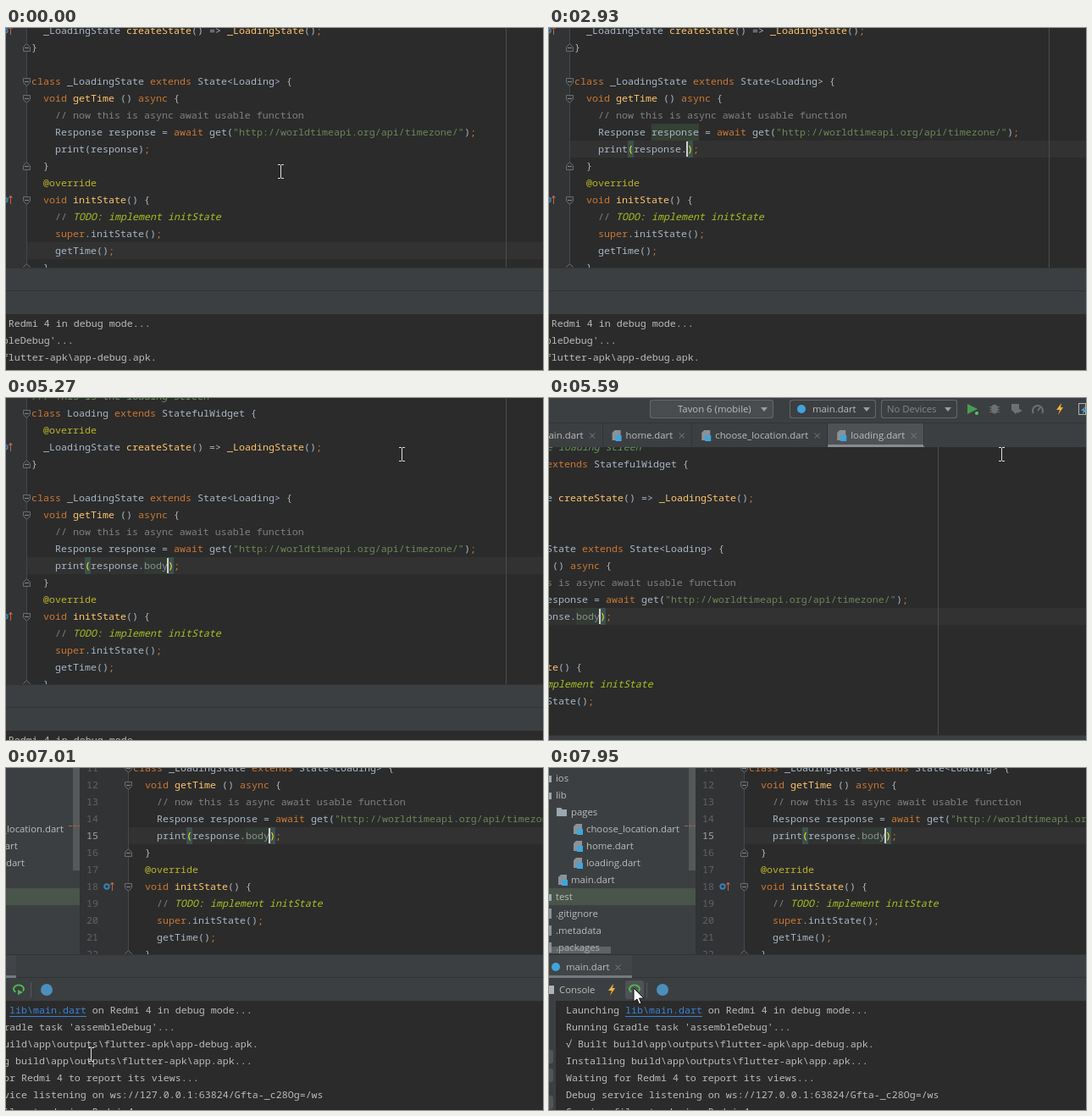
These frames come from a looping animation (634x404 px, 8000 ms). An HTML page with a canvas:

```html
<!DOCTYPE html>
<html lang="en">
<head>
<meta charset="utf-8">
<title>Editor session</title>
<style>
html, body { margin: 0; width: 100%; height: 100%; overflow: hidden; background: #2b2b2b; }
canvas { display: block; }
</style>
</head>
<body>
<canvas id="stage" width="634" height="404"></canvas>
<script>
const g = document.getElementById('stage').getContext('2d');
const W = 634, H = 404, LOOP = 8000, STEP = 79;
const MARGIN_X = 100, MARGIN_Y = 66, TOP = -148, ROW = 20, CHAR = 7;
const MONO = "11.67px 'Noto Sans Mono', 'DejaVu Sans Mono', monospace";
const UI = "11.35px 'Open Sans', 'Noto Sans', sans-serif";
const PANEL = '#3c3f41', DARK = '#2b2b2b', LINE = '#323232', HOVER = '#4f5355', GREY = '#6e7173';
const TEXT = '#a9b7c6', LABEL = '#bbbbbb', ORANGE = '#cc7832', YELLOW = '#ffc66d';
const BLUE = '#40a5dc', GREEN = '#499c54', ICON = '#afb1b3';

// Pointer strokes: start, end (ms), destination in world space
const moves = [
  [520, 990, 111, 101], [1070, 1310, 160, 136], [1380, 1610, 158, 138], [2240, 2380, 316, 139],
  [5200, 5270, 467, 11], [5360, 6050, 804, -91], [6370, 6370, 808, -91],
  [6460, 7000, -20, 401], [7080, 7160, -49, 362], [7390, 7470, -63, 343], [7560, 7950, -106, 323]
];

const code = `/// This is the loading screen
class Loading extends StatefulWidget {
  @override
  _LoadingState createState() => _LoadingState();
}

class _LoadingState extends State<Loading> {
  void getTime () async {
    // now this is async await usable function
    Response response = await get("http://worldtimeapi.org/api/timezone/");

  }
  @override
  void initState() {
    // TODO: implement initState
    super.initState();
    getTime();
  }`.split('\n');
const log = String.raw`Launching lib\main.dart on Redmi 4 in debug mode...
Running Gradle task 'assembleDebug'...
√ Built build\app\outputs\flutter-apk\app-debug.apk.
Installing build\app\outputs\flutter-apk\app.apk...
Waiting for Redmi 4 to report its views...
Debug service listening on ws://127.0.0.1:63824/Gfta-_c28Og=/ws
Syncing files to device Redmi 4...`.split('\n');
const tree = `android
ios
lib
 pages
  choose_location.dart
  home.dart
  loading.dart
 main.dart
test
.gitignore
.metadata
.packages`.split('\n');
const members = `body String,bodyBytes Uint8List,contentLength int,headers Map,isRedirect bool,persistentConnection bool,
reasonPhrase String,request BaseRequest,statusCode int,hashCode int,runtimeType Type,toString() String`
  .split(',').map(s => s.trim().split(' '));
const tabs = ['main.dart', 'home.dart', 'choose_location.dart', 'loading.dart'];
const menus = ['Build', 'Run', 'Tools', 'VCS', 'Window', 'Help'];

const clamp = (v, lo, hi) => Math.max(lo, Math.min(hi, v));

function box(x, y, w, h, c) { g.fillStyle = c; g.fillRect(x, y, w, h); }
function frame(x, y, w, h, c) { g.strokeStyle = c; g.lineWidth = 1; g.strokeRect(x + .5, y + .5, w, h); }
function round(x, y, w, h, c) { g.fillStyle = c; g.beginPath(); g.roundRect(x, y, w, h, 3); g.fill(); }
function disc(x, y, r, c) { g.fillStyle = c; g.beginPath(); g.arc(x, y, r, 0, 7); g.fill(); }
function arc(x, y, r, c, from = 0, to = 7, w = 1.5) {
  g.strokeStyle = c; g.lineWidth = w; g.beginPath(); g.arc(x, y, r, from, to); g.stroke();
}
function shape(x, y, pts, fill, stroke, width = 1) {
  g.beginPath();
  for (let i = 0; i < pts.length; i += 2) g.lineTo(x + pts[i], y + pts[i + 1]);
  if (fill) { g.closePath(); g.fillStyle = fill; g.fill(); }
  if (stroke) { g.strokeStyle = stroke; g.lineWidth = width; g.stroke(); }
}
function text(s, x, y, c = LABEL, font = UI, align = 'left') {
  g.font = font; g.fillStyle = c; g.textAlign = align;
  g.fillText(s, x, y + 4);
}
function mono(s, x, y, c = TEXT) { text(s, x, y, c, MONO); }
function width(s) { g.font = UI; return g.measureText(s).width; }
function inside(p, x, y, w, h) { return p.x >= x && p.x < x + w && p.y >= y && p.y < y + h; }

function cross(x, y) {
  for (const d of [-3, 3]) shape(x, y, [-d, -3, d, 3], 0, '#7c7f81');
}
function bolt(x, y) { shape(x, y, [2, -7, -4, 1, 0, 1, -2, 7, 4, -2, 1, -2], '#f4af3d'); }
function bug(x, y, c) {
  for (const d of [-3, 0, 3]) box(x - 6, y + d, 12, 1, c);
  g.fillStyle = c; g.beginPath(); g.ellipse(x, y, 4, 5.5, 0, 0, 7); g.fill();
}
function play(x, y, r, c) { shape(x, y, [-r, -r, r, 0, -r, r], c); }
function phone(x, y) { frame(x - 4, y - 7, 8, 13, ICON); }
function page(x, y, dart) {
  shape(x, y, [-5, -3, -2, -6, 5, -6, 5, 6, -5, 6], '#8a9299');
  if (dart) box(x - 1, y, 7, 7, BLUE);
}
function folder(x, y) { shape(x, y, [-6, -5, -1, -5, 1, -3, 6, -3, 6, 5, -6, 5], '#9aa7b0'); }

// The camera is pushed along whenever the pointer reaches the margin of the view
function pose(t) {
  let x = 324, y = 169, cx = 0, cy = 0;
  for (const [start, end, toX, toY] of moves) {
    if (t < start) break;
    const n = Math.round((end - start) / STEP) + 1, x0 = x, y0 = y;
    const done = t >= end ? n : Math.floor((t - start + 9) / STEP) + 1;
    for (let i = 1; i <= Math.min(done, n); i++) {
      const p = Math.sin(i / n * Math.PI / 2);
      x = x0 + (toX - x0) * p;
      y = y0 + (toY - y0) * p;
      cx = clamp(cx, x - W + MARGIN_X, x - MARGIN_X);
      cy = Math.max(TOP, clamp(cy, y - H + MARGIN_Y, y - MARGIN_Y));
    }
  }
  return { x: Math.round(x), y: Math.round(y), cx: Math.round(cx), cy: Math.round(cy) };
}

// Five keystrokes, getting quicker after the dot
function typedAt(t) {
  return [...'.body'].filter((_, i) => t >= 2930 + 880 * (i / 4) ** .73).join('');
}

const tokens = /("[^"]*"|\b(?:class|extends|void|async|await|super)\b|;|@\w+|createState|getTime(?= )|initState(?=\(\) \{)|_LoadingState(?=\())/;
function tokenColor(s, odd) {
  if (!odd) return TEXT;
  if (s[0] === '"') return '#6a8759';
  if (s[0] === '@') return '#bbb529';
  return /^(class|extends|void|async|await|super|;)$/.test(s) ? ORANGE : YELLOW;
}
function codeLine(s, y) {
  const body = s.trim();
  let x = 30 + (s.length - body.length) * CHAR;
  if (body.startsWith('///')) return text(body, x, y, '#629755', 'italic ' + MONO);
  if (body.startsWith('// TODO')) {
    mono('//', x, y, '#808080');
    return text(body.slice(3), x + 3 * CHAR, y, '#a8c023', 'italic ' + MONO);
  }
  if (body.startsWith('//')) return mono(body, x, y, '#808080');
  body.split(tokens).forEach((part, i) => {
    mono(part, x, y, tokenColor(part, i % 2));
    x += part.length * CHAR;
  });
}

function printLine(t, typed) {
  const y = 143, active = t >= 1840, done = t >= 4500, close = 156 + typed.length * CHAR;
  const brace = active ? '#ffef28' : TEXT;
  if (active) for (const x of [93, close]) box(x, y - 10, CHAR, ROW, '#3b514d');
  if (done) box(163, y - 10, 4 * CHAR, ROW, '#323a34');
  mono('print', 58, y);
  mono('(', 93, y, brace);
  mono('response' + typed.slice(0, 1), 100, y);
  mono(typed.slice(1), 163, y, done ? '#8a8f91' : TEXT);
  mono(')', close, y, brace);
  mono(';', close + CHAR, y, ORANGE);
  if (active && (t < 7390 || t > 7800)) box(close - 1, y - 9, 2, 18, '#d0d0d0');
}

function fold(y, d) {
  shape(24.5, y + .5, [-4, -4 * d, 4, -4 * d, 4, d, 0, 5 * d, -4, d, -4, -4 * d], '#313335', '#6a6e70');
  box(22, y, 5, 1, '#83878a');
}

function editor(t, typed) {
  g.save();
  g.beginPath(); g.rect(-32, -57, 1400, 340); g.clip();
  box(-32, -57, 1400, 340, DARK);
  box(-32, -57, 56, 340, '#313335');
  const lineY = n => 63 + ROW * (n - 11), current = t < 1840 ? 21 : 15;
  box(25, lineY(current) - 10, 1400, ROW, LINE);
  box(590, -57, 1, 340, '#4d4d4d');
  box(24, -57, 1, 340, '#45484a');
  if (t >= 2240 && t < 4500) box(121, 113, 8 * CHAR, ROW, '#344134');
  code.forEach((s, i) => {
    const n = i + 5, y = lineY(n);
    text(n, -11, y, n === current ? '#a4a3a3' : '#606366', MONO, 'right');
    codeLine(s, y);
    if (/\{$/.test(s)) fold(y, 1);
    if (/^ *\}$/.test(s)) fold(y, -1);
    if (/createState|void init/.test(s)) {
      arc(-1, y, 2.7, '#3a80b4', 0, 7, 2);
      shape(5.5, y, [0, 5, 0, -5, -2, -2, 0, -5, 2, -2], 0, '#c8633f');
    }
  });
  printLine(t, typed);
  g.restore();
}

function popup(t, typed) {
  const rows = t < 3320 ? members : members.slice(0, 2);
  const h = rows.length * ROW + 24, hit = typed.length - 1, foot = 140 + h;
  box(119, 152, 481, h, '#46484a');
  frame(119, 152, 480, h - 1, '#555759');
  box(120, 153, 479, ROW, '#4d5662');
  rows.forEach(([name, type], i) => {
    const y = 163 + i * ROW, isField = name === 'bodyBytes';
    disc(133.5, y, 7, isField ? '#c48b3c' : '#8b6fa6');
    text(isField ? 'f' : 'p', 133.5, y, DARK, UI, 'center');
    if (isField) {
      box(146, y, 7, 4, GREEN);
      arc(148, y, 2.5, GREEN, Math.PI, 2 * Math.PI, 1);
    }
    mono(name, 162, y, LABEL);
    mono(name.slice(0, hit), 162, y, '#5a9df0');
    text(type, 588, y, '#8c8f91', MONO, 'right');
  });
  text('Press Enter to insert, Tab to replace', 125, foot, '#8c8f91', "9.2px 'Open Sans', sans-serif");
  for (const d of [-5, -1, 3]) box(586, foot + d, 2, 2, '#c8c8c8');
}

function dropdown(x, w, label, indent, fill = PANEL, c = LABEL) {
  round(x, -113, w, 22, '#646769');
  round(x + 1, -112, w - 2, 20, fill);
  text(label, x + indent, -102, c);
  shape(x + w - 11, -102, [-4, -2, 4, -2, 0, 3], '#9a9da0');
}

const actions = [
  (x, y) => { play(x, y, 6, GREEN); disc(x + 5, y + 5, 2, '#59c46a'); },
  (x, y) => bug(x, y, GREY),
  (x, y) => { shape(x, y, [-6, -6, 3, -6, 3, 1, -1, 6, -6, 1], GREY); play(x + 4, y + 2, 3, GREY); },
  (x, y) => { arc(x, y + 2, 6, GREY, 2.6, 6.8, 2); shape(x, y + 2, [0, 0, 3, -4], 0, GREY, 2); },
  bolt,
  (x, y) => { phone(x, y); shape(x + 2, y, [2, -3, -3, 2, 0, 2, -1, 6, 4, 1, 1, 1], BLUE); },
  (x, y) => { bug(x, y, GREEN); shape(x + 4, y + 3, [-4, -4, 1, 1, 1, -3, 1, 1, -3, 1], 0, '#d0d3d5', 1.5); },
  (x, y) => box(x - 5, y - 5, 11, 11, '#c8744f')
];

function header(p) {
  const y = -102;
  box(-700, TOP, 2200, 91, PANEL);
  let x = 297;
  for (const s of [...menus].reverse()) {
    text(s, x, -133, LABEL, UI, 'right');
    x -= width(s) + 14;
  }
  text(String.raw`worl_time_new [D:\Coding_Projects\Andorid\worl_time_new] - ...\pages\loading.dart [worl_time_new]`,
    310, -133, '#989a9c', "11.5px 'Open Sans', 'Noto Sans', sans-serif");
  box(881, -134, 10, 1, '#c8c8c8');
  box(-700, -86, 2200, 1, LINE);
  dropdown(250, 146, 'Tavon 6 (mobile)', 33, '#484c4f');
  dropdown(415, 102, 'main.dart', 27);
  disc(429, y, 5, BLUE);
  dropdown(523, 90, 'No Devices', 7, PANEL, '#85888a');
  if (inside(p, 800, -114, 24, 25)) round(800, -113, 23, 23, HOVER);
  actions.forEach((draw, i) => draw(631 + Math.round(25.8 * i), y));
  box(830, y - 9, 1, 18, '#515456');
  folder(844, y);
  box(846, y, 5, 5, BLUE);
  frame(871, y - 6, 13, 11, ICON);
  box(871, y - 6, 14, 3, ICON);
  play(877, y + 1, 2.5, '#59c46a');
  phone(903, y);
  disc(908, y + 4, 4, '#59c46a');

  x = 120;
  for (const s of tabs) {
    const end = x + width(s);
    if (s === 'loading.dart') {
      box(x - 27, -85, end - x + 50, 28, '#4e5254');
      box(x - 27, -60, end - x + 50, 3, '#868b90');
    }
    page(x - 11, -71, true);
    text(s, x, -71);
    cross(end + 10.5, -70.5);
    box(Math.round(end) + 22, -85, 1, 27, LINE);
    x = end + 50;
  }
}

function project() {
  box(-700, -57, 668, 340, PANEL);
  box(-700, 205, 668, ROW, '#49544a');
  tree.forEach((s, i) => {
    const label = s.trim(), x = -198 + 18 * (s.length - label.length), y = 55 + ROW * i;
    if (label.includes('.')) page(x - 10, y, label.endsWith('.dart'));
    else folder(x - 11, y);
    text(label, x, y);
  });
  box(-41, -57, 8, 241, 'rgba(150,153,155,.28)');
  box(-400, 274, 267, 8, 'rgba(150,153,155,.4)');
  for (let x = -46; x < -32; x += 5) box(x, 131, 4, 1, '#b0603f');
  box(-33, -57, 1, 340, LINE);
}

function runPanel(p) {
  box(-700, 283, 2200, 55, PANEL);
  for (const y of [283, 310]) box(-700, y, 2200, 1, LINE);
  box(-700, 284, 592, 24, '#414547');
  box(-700, 308, 592, 3, '#747a80');
  disc(-198, 298, 5, BLUE);
  text('main.dart', -186, 298);
  cross(-124.5, 298.5);
  box(-209, 320, 9, 10, ICON);
  text('Console', -194, 325);
  bolt(-132, 325);
  if (inside(p, -116, 314, 22, 22)) round(-116, 314, 22, 22, HOVER);
  g.strokeStyle = '#4fb653'; g.lineWidth = 2;
  g.beginPath(); g.ellipse(-105, 324, 6, 4.5, 0, 2.2, 6.9); g.stroke();
  play(-103, 328, 3, '#4fb653');
  box(-91, 316, 1, 18, '#55585a');
  disc(-72, 325, 7, '#4b8fbd');

  box(-700, 338, 2200, 300, DARK);
  box(-700, 338, 502, 300, PANEL);
  for (const y of [404, 426, 458]) round(-212, y - 8, 11, 16, '#515557');
  log.forEach((s, i) => mono(s, -186, 349 + i * ROW, LABEL));
  box(-116, 340, 91, 18, DARK);
  mono('lib\\main.dart', -116, 349, '#3a82d8');
  box(-116, 356, 91, 1, '#3a82d8');
}

function pointer(p) {
  const { x, y } = p;
  if (inside(p, -116, 339, 91, 20)) {
    for (const [grow, c] of [[1, '#222'], [0, '#fff']]) {
      round(x - 9 - grow, y - grow, 4 + 2 * grow, 14 + 2 * grow, c);
      round(x - 13 - grow, y + 8 - grow, 14 + 2 * grow, 11 + 2 * grow, c);
    }
    box(x - 9, y + 4, 4, 8, '#fff');
  } else if (inside(p, 0, -57, 1400, 340) || inside(p, -198, 338, 1600, 300)) {
    box(x, y - 7, 1, 15, '#e0e0e0');
    for (const dy of [-8, 8]) for (const dx of [-3, 1]) box(x + dx, y + dy, 3, 1, '#e0e0e0');
  } else {
    shape(x, y, [0, 0, 0, 16, 4, 13, 6.5, 19, 9, 18, 6.5, 12, 12, 12, 0, 0], '#fff', '#111');
  }
}

function draw(t) {
  const p = pose(t), typed = typedAt(t);
  g.setTransform(1, 0, 0, 1, -p.cx, -p.cy);
  header(p);
  project();
  editor(t, typed);
  runPanel(p);
  if (t >= 3080 && t < 4500) popup(t, typed);
  if (t < 2930 || t >= 5200) pointer(p);
}

const start = performance.now();
function tick() {
  draw((performance.now() - start) % LOOP);
  requestAnimationFrame(tick);
}
tick();
</script>
</body>
</html>
```
